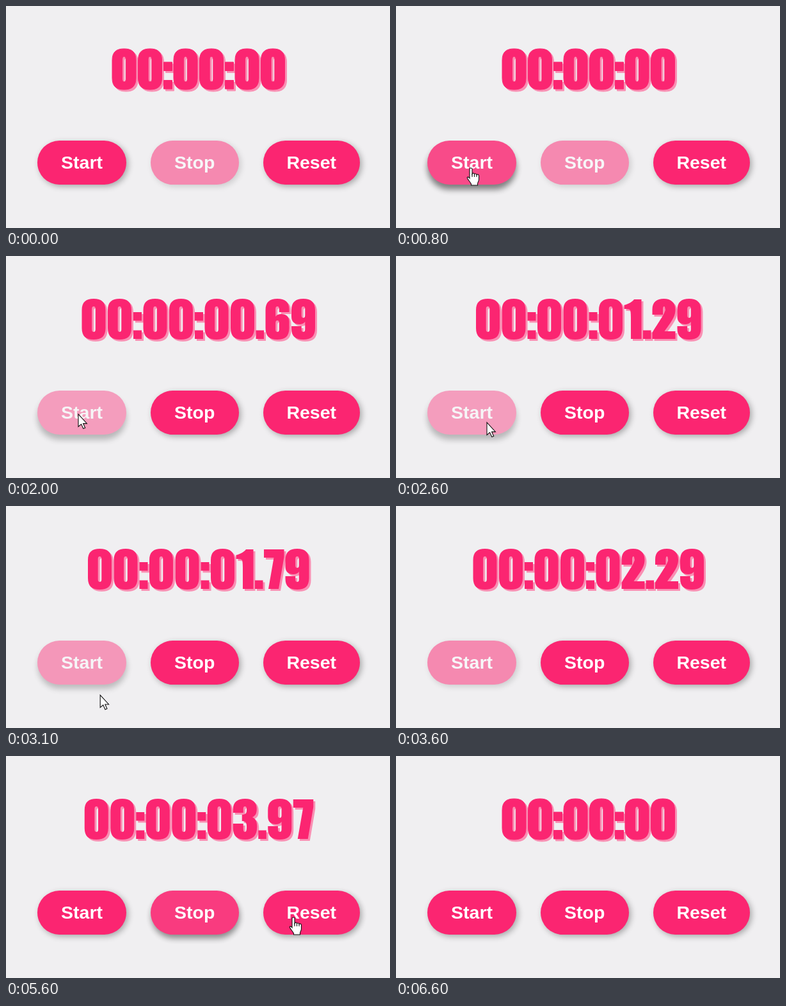
An HTML page with a canvas that plays this animation: 600x348 px, repeating every 7000 ms.

```html
<!DOCTYPE html>
<html lang="en">
<head>
<meta charset="utf-8">
<title>Stopwatch</title>
<style>
  html, body { margin: 0; width: 100%; height: 100%; overflow: hidden; background: #f0eff1; }
  .button {
    position: absolute; top: 210.5px; height: 69.5px; line-height: 69.5px;
    border-radius: 35px; background: #fb2571; color: #fff; text-align: center;
    font: bold 28.5px/69.5px "Liberation Sans", Arial, sans-serif;
  }
  canvas { position: absolute; left: 0; top: 0; }
</style>
</head>
<body>
<div class="button" style="left:49px;width:139px">Start</div>
<div class="button" style="left:225.5px;width:138.5px">Stop</div>
<div class="button" style="left:401.5px;width:151.5px">Reset</div>
<canvas width="600" height="348"></canvas>
<script>
const LOOP = 7000, STEP = 100, FADE = 250;
const STARTED = 1310, STOPPED = 5280, CLEARED = 5950;
const PINK = '#fb2571', PALE = '#f98fb3';
const ctx = document.querySelector('canvas').getContext('2d');

// Heavy condensed numerals, 64 px tall: [advance, outline]
const slot = (top, bottom) =>
  `M17.2 ${top + 4}Q17.2 ${top} 20 ${top}T22.8 ${top + 4}V${bottom - 4}Q22.8 ${bottom} 20 ${bottom}T17.2 ${bottom - 4}Z`;
const six = 'M38.5 21H22.8V16Q22.8 12 20 12T17.2 16V28C19 25.5 22 24 26 24C34 24 38.5 28 38.5 36V46' +
  'C38.5 59 32 64 20 64S1.5 59 1.5 46V18C1.5 5 8 0 20 0S38.5 5 38.5 17Z' + slot(34, 52);
const outlines = {
  0: [40.5, 'M1.5 18C1.5 5 8 0 20 0S38.5 5 38.5 18V46C38.5 59 32 64 20 64S1.5 59 1.5 46Z' + slot(12, 52)],
  1: [29.5, 'M27.5 1V63H11V29.5C11 22.5 10.5 18.5 9.5 17.5S6 16 .5 16V10C8 8 13 5 16 1Z'],
  2: [38.5, 'M1 25V17C1 5 8 0 19 0S37 6 37 17C37 26 34 32 20 51H37V63H1V53C15 30 21 23 21 17Q21 12 19.3 12T17.5 17V25Z'],
  3: [40, 'M1 22V17C1 5 8 0 20 0S38 6 38 16C38 23 36 27 31 29C36 31 38.5 35 38.5 44C38.5 58 32 64 20 64' +
    'S1 59 1 46V39H17V47Q17 52 19.5 52T22.3 46V43C22.3 37 20 35 15 35V25C20 25 22.3 23 22.3 18V16Q22.3 12 19.5 12T17 17V22Z'],
  4: [39, 'M14 1H34V39H38V51H34V63H18.5V51H1V39ZM18.5 39V15L12.5 39Z'],
  5: [40.5, 'M4 1H37V12H19V23C21 21.5 23 21 26 21C34 21 38.5 26 38.5 34V44C38.5 58 32 64 20 64S2 58 2 46V41H17.5' +
    'V47Q17.5 52 20 52T22.8 47V36Q22.8 31 20 31T17.5 36H2Z'],
  6: [40.5, six],
  7: [32.5, 'M.5 1H32V13L23.5 63H7.5L16 14H.5Z'],
  8: [40.5, 'M38 16C38 23 36 27 32 29C36.5 31 38.5 35 38.5 43V46C38.5 59 32 64 20 64S1.5 59 1.5 46V43' +
    'C1.5 35 3.5 31 8 29C4 27 2 23 2 16C2 5 8 0 20 0S38 5 38 16Z' + slot(12, 25) + slot(35, 52)],
  ':': [15, 'M1 21H14V34.5H1ZM1 49.5H14V63H1Z'],
  '.': [14, 'M.5 49.5H13V63H.5Z']
};
const glyphs = {};
for (const key in outlines) {
  const [advance, outline] = outlines[key];
  glyphs[key] = { advance, path: new Path2D(outline) };
}
const nine = new Path2D();
nine.addPath(new Path2D(six), new DOMMatrix([-1, 0, 0, -1, 40, 64]));
glyphs[9] = { advance: 40.5, path: nine };

const arrow = new Path2D('M0 0V19.5L4.6 15.6L7.8 22.6L10.7 21.4L7.6 14.6H13.4Z');
const hand = new Path2D('M4 1.5C4 -.5 8 -.5 8 1.5V9C8.5 7.5 11.5 8 11.5 9.5C12 8.5 15 9 15 10.5' +
  'C16 9.5 18.5 10 18.5 12V18C18.5 21 16.5 22 16.5 25V27H6.5V25C5 22 2 19 .5 16C-.5 14 2 13 4 16Z');
const fingers = new Path2D('M8 9V14M11.5 9.5V14M15 10.5V14');

// Pointer stops: [time, x, y]
const visits = [
  [[600, 125, 266], [900, 113, 248], [2200, 113, 248], [2600, 142, 261], [2900, 142, 262], [3400, 155, 348]],
  [[3800, 490, 344], [4500, 340, 286], [4600, 321, 281], [4800, 300, 257], [5500, 308, 255],
    [5600, 449, 253], [6000, 455, 250], [6200, 455, 250]]
];

const buttons = [...document.querySelectorAll('.button')];
const states = [
  { hover: [600, 3060], enabled: t => 1 - fade(t, STARTED) + fade(t, STOPPED) },
  { hover: [4650, 5540], enabled: t => fade(t, STARTED) },
  { hover: [5590, 6270], enabled: () => 1 }
];

const mix = (a, b, p) => a + (b - a) * p;
function fade(t, start) {
  const p = Math.min(1, Math.max(0, (t - start) / FADE));
  return 1 - (1 - p) ** 2;
}

function drawButtons(t) {
  states.forEach(({ hover, enabled }, i) => {
    const lift = fade(t, hover[0]) - fade(t, hover[1]);
    const style = buttons[i].style;
    style.opacity = mix(0.5, 1, enabled(t)) * mix(1, 0.8, lift);
    style.boxShadow =
      `${mix(3, 0, lift)}px ${mix(3, 8, lift)}px 10px rgba(0,0,0,${mix(0.3, 0.6, lift)})`;
  });
}

function clockText(t) {
  if (t < STARTED || t >= CLEARED) return '00:00:00';
  const hundredths = Math.floor((Math.min(t, STOPPED) - STARTED) / 10);
  return '00:00:' + (hundredths / 100).toFixed(2).padStart(5, '0');
}

function drawClock(text) {
  const chars = [...text].map(c => glyphs[c]);
  const width = chars.reduce((sum, g) => sum + g.advance, 0);
  const resting = text.length === 8;
  for (const [color, shift] of [[PALE, 3], [PINK, 0]]) {
    ctx.save();
    ctx.fillStyle = ctx.strokeStyle = color;
    ctx.lineWidth = 1;
    ctx.translate(301 - width / 2 + shift, 67 + shift);
    for (const { advance, path } of chars) {
      ctx.fill(path, 'evenodd');
      if (resting) ctx.stroke(path);
      ctx.translate(advance, 0);
    }
    ctx.restore();
  }
}

function pointerAt(t) {
  for (const stops of visits) {
    for (let i = 1; i < stops.length; i++) {
      const [t0, x0, y0] = stops[i - 1], [t1, x1, y1] = stops[i];
      if (t < t0 || t > t1) continue;
      const p = (t - t0) / (t1 - t0);
      return [mix(x0, x1, p), mix(y0, y1, p)];
    }
  }
  return null;
}

function drawPointer(t) {
  const spot = pointerAt(t);
  if (!spot) return;
  const pointing = t < STARTED || t > 4650;
  const shape = pointing ? hand : arrow;
  ctx.save();
  ctx.translate(spot[0] - (pointing ? 6 : 0), spot[1]);
  ctx.fillStyle = '#fff';
  ctx.strokeStyle = '#111';
  ctx.lineWidth = 1.1;
  ctx.fill(shape);
  ctx.stroke(shape);
  if (pointing) ctx.stroke(fingers);
  ctx.restore();
}

function render() {
  const t = Math.floor((performance.now() % LOOP) / STEP) * STEP;
  ctx.clearRect(0, 0, 600, 348);
  drawButtons(t);
  drawClock(clockText(t));
  drawPointer(t);
  requestAnimationFrame(render);
}
render();
</script>
</body>
</html>
```
